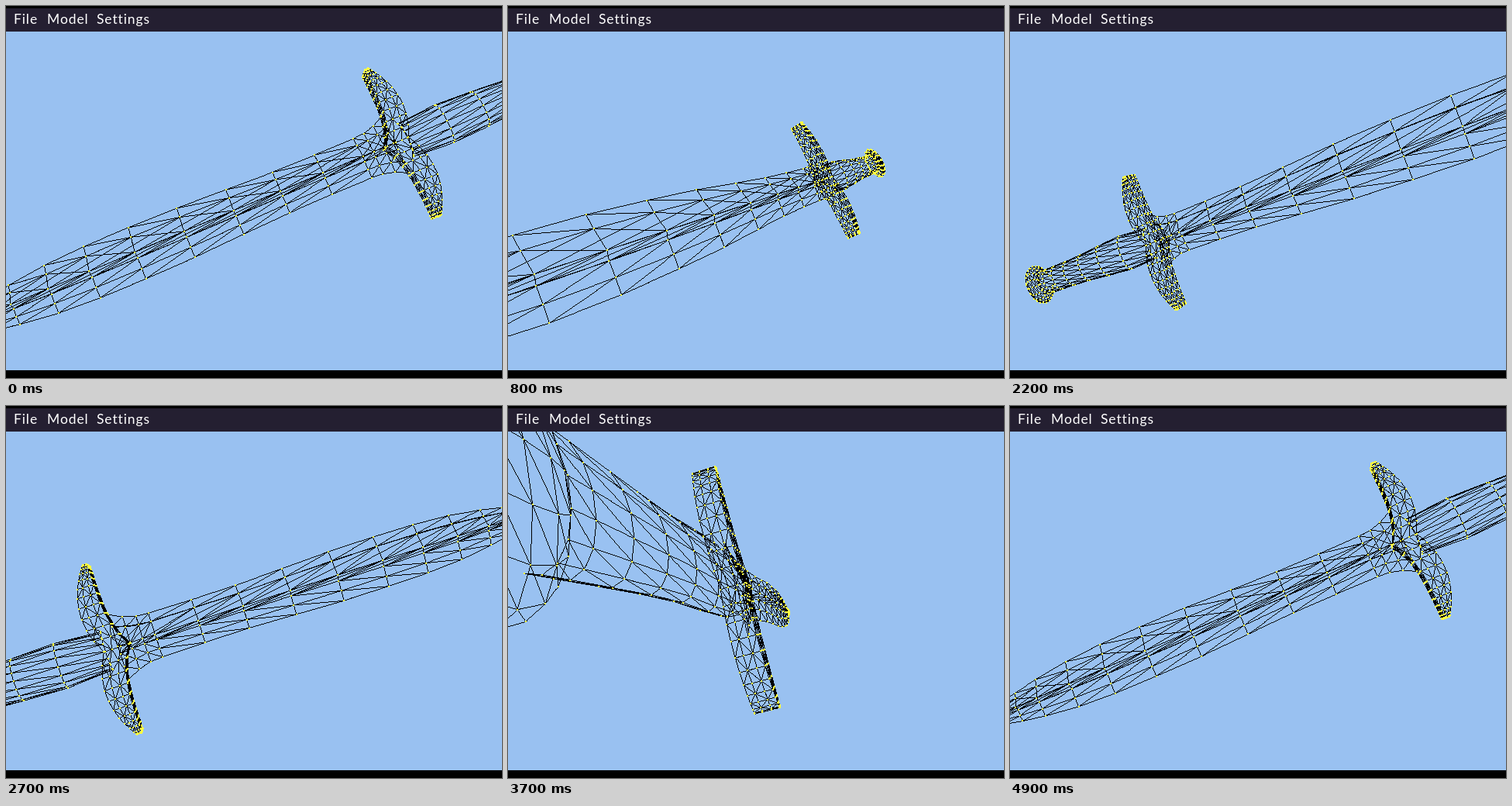
Recreate the animation shown at these times as an HTML page with a canvas. Size 640 by 480 pixels, loop 5000 ms.

```html
<!DOCTYPE html>
<html lang="en">
<head>
<meta charset="utf-8">
<title>Model viewer</title>
<style>
html, body { margin: 0; width: 100%; height: 100%; overflow: hidden; background: #000; }
#stage { position: relative; width: 640px; height: 480px; overflow: hidden; }
canvas { position: absolute; left: 0; top: 0; }
nav { position: absolute; left: 0; top: 0; width: 640px; height: 30px; border-top: 3px solid #000;
  background: #241f31; color: #fff; font: 17.5px/27px Lato, "Open Sans", sans-serif; letter-spacing: .9px; }
nav span { position: absolute; top: 0; }
footer { position: absolute; left: 0; top: 470px; width: 640px; height: 10px; background: #000; }
</style>
</head>
<body>
<div id="stage">
  <canvas id="view" width="640" height="480"></canvas>
  <nav><span style="left:10px">File</span><span style="left:53px">Model</span><span style="left:117px">Settings</span></nav>
  <footer></footer>
</div>
<script>
const W = 640, H = 480, LOOP = 5000, STEP = 100;
const SKY = 0xfff1c199, INK = 0xff000000, DOT = 0xff40ffff;
const { PI, sin, cos, abs, min, max, exp } = Math;
const clamp = (x, lo, hi) => max(lo, min(hi, x));
const range = (n, f) => Array.from({ length: n }, (_, i) => f(i));
const turn = deg => [cos(deg * PI / 180), sin(deg * PI / 180)];

// Model space: s runs along the sword to the pommel, v across it, n through its thickness.
const PIVOT = .353, verts = [], faces = [];

function loft(rings, diagonal, fans = []) {
  const base = verts.length, m = rings[0].length;
  const at = (i, j) => base + i * m + j % m;
  for (const ring of rings) verts.push(...ring);
  for (let i = 0; i < rings.length - 1; i++) {
    for (let j = 0; j < m; j++) {
      const a = at(i, j), b = at(i + 1, j), c = at(i + 1, j + 1), d = at(i, j + 1);
      if (diagonal(i, j)) faces.push([a, b, c], [a, c, d]);
      else faces.push([a, b, d], [b, c, d]);
    }
    if (i + 2 < rings.length)
      for (const j of fans) faces.push([at(i, j), at(i + 2, j), at(i + 2, j + 1)]);
  }
}

// Blade: a pointed tip, a belly, a slow taper and a flare at the root
const TIP = -.915;
function bladeWidth(s) {
  const u = s - TIP;
  const belly = .067 * sin(PI / 2 * min(1, u / .47) ** .95);
  const taper = .0072 * (1 - cos(PI * clamp((u - .6) / .45, 0, 1)));
  return belly - taper + .023 * max(0, (s - .27) / .075) ** 2;
}
const stations = [
  ...range(5, k => TIP + .249 * (k / 5) ** 1.5),
  ...range(9, k => -.666 + .116 * k - .02 * sin(PI * k / 4)),
  ...range(3, k => .29 + .028 * k)
];
const front = [[1, 0], [.6, .004], [.2, .006], [-.03, .0125], [-.62, .0035], [-1, 0]];
const back = front.slice(1, -1).reverse().map(([v, n]) => [v, -n]);
loft(
  stations.map(s => {
    const w = bladeWidth(s);
    return [...front, ...back].map(([v, n]) => [s, v * w, n * min(1, w / .05)]);
  }),
  (i, j) => j < 3 || (j > 4 && j < 8),
  [2, 3, 6, 7]
);

// Guard: a square bar, each half a bow with its tip turned towards the blade
const HALF = 11;
loft(
  range(2 * HALF + 1, k => {
    const q = sin((k / HALF - 1) * PI / 2), t = abs(q);
    const inner = -.032 * (1 - t) ** 4, outer = .0226 + .1034 * t - .1165 * t * t;
    return range(12, j => {
      const a = PI * (j + .5) / 6;
      const f = clamp(-1.41 * cos(a), -1, 1), n = clamp(1.41 * sin(a), -1, 1);
      return [PIVOT + inner + (f + 1) / 2 * (outer - inner), .195 * q, .0195 * n];
    });
  }),
  (i, j) => (i + j) % 2
);

// Grip and pommel: oval rings, first a swelling handle, then a rounded flange
const oval = (s, rv, rn) => range(16, j => [s, rv * cos(PI * j / 8), rn * sin(PI * j / 8)]);
loft(
  [
    ...range(8, k => {
      const s = .372 + .456 * (1 - (1 - k / 7) ** 1.6);
      return oval(s, .039 + .012 * exp(-(((s - .48) / .12) ** 2)), .021);
    }),
    ...range(6, k => {
      const a = PI * (k + 1) / 6;
      return oval(.86 - .032 * cos(a), .039 + .024 * sin(a), .02 + .005 * sin(a));
    })
  ],
  (i, j) => j < 8
);

// Fixed pose of the sword on its turntable, and of the camera
const FOCAL = 532, CX = 328, CY = 245;
const [leanC, leanS] = turn(5.5), [droopC, droopS] = turn(1.9);
const [pitchC, pitchS] = turn(4.5), [rollC, rollS] = turn(20.8);

const posed = verts.map(([s, v, n]) => {
  const v1 = v * leanC - n * leanS, n1 = n * leanC + v * leanS, ds = s - PIVOT;
  return [PIVOT + ds * droopC + v1 * droopS, v1 * droopC - ds * droopS, n1];
});

function project([s, v, n], yawC, yawS) {
  const x = s * yawC + n * yawS, depth = s * yawS - n * yawC;
  const k = FOCAL / (1 + depth * pitchC - v * pitchS);
  const a = x * k, b = (v * pitchC + depth * pitchS) * k;
  return [CX + a * rollC + b * rollS, CY - a * rollS + b * rollC];
}

const ctx = document.getElementById("view").getContext("2d");
const image = ctx.createImageData(W, H);
const pixels = new Uint32Array(image.data.buffer);

function plot(x, y, color) {
  if (x >= 0 && x < W && y >= 0 && y < H) pixels[y * W + x] = color;
}

function line([x0, y0], [x1, y1]) {
  if (max(x0, x1) < 0 || min(x0, x1) > W || max(y0, y1) < 0 || min(y0, y1) > H) return;
  const n = Math.ceil(max(abs(x1 - x0), abs(y1 - y0))) || 1;
  for (let i = 0; i <= n; i++)
    plot(Math.floor(x0 + (x1 - x0) * i / n), Math.floor(y0 + (y1 - y0) * i / n), INK);
}

function draw(time) {
  const [yawC, yawS] = turn(360 * time / LOOP - 2);
  const pts = posed.map(p => project(p, yawC, yawS));
  const seen = new Set();
  pixels.fill(SKY);
  for (const [a, b, c] of faces) {
    const p = pts[a], q = pts[b], r = pts[c];
    const area = (q[0] - p[0]) * (r[1] - p[1]) - (q[1] - p[1]) * (r[0] - p[0]);
    if (area >= 0) continue; // faces turned away
    line(p, q);
    line(q, r);
    line(r, p);
    seen.add(a).add(b).add(c);
  }
  for (const i of seen) {
    const x = Math.round(pts[i][0]), y = Math.round(pts[i][1]);
    for (let d = 0; d < 4; d++) plot(x - (d & 1), y - (d >> 1), DOT);
  }
  ctx.putImageData(image, 0, 0);
}

const start = performance.now();
let shown = -1;
function tick() {
  const step = Math.floor((performance.now() - start) % LOOP / STEP);
  if (step !== shown) draw((shown = step) * STEP);
  requestAnimationFrame(tick);
}
tick();
</script>
</body>
</html>
```
